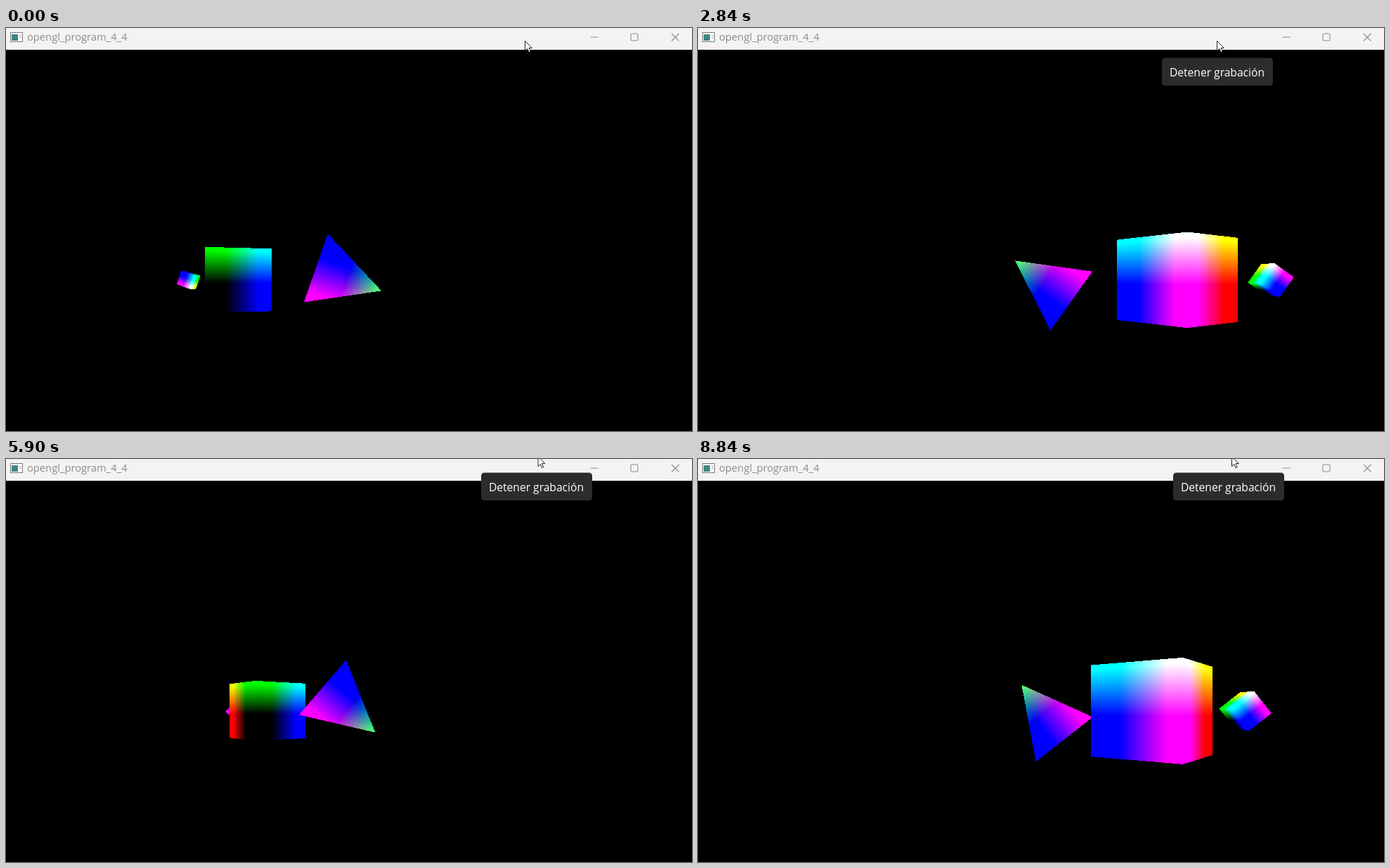
Animation, 976 px wide and 574 px high, one loop 8880 ms. Source, as an HTML page with a canvas:

```html
<!DOCTYPE html>
<html lang="es">
<head>
<meta charset="utf-8">
<title>opengl_program_4_4</title>
<style>
html, body { margin: 0; width: 100%; height: 100%; overflow: hidden; background: #000; }
canvas, svg { position: absolute; left: 0; top: 0; display: block; }
text { font-family: "Open Sans", "Noto Sans", sans-serif; }
</style>
</head>
<body>
<canvas id="view" width="976" height="574"></canvas>
<svg width="976" height="574" viewBox="0 0 976 574">
  <rect width="976" height="31" fill="#f3f3f3"/>
  <g id="icon">
    <rect x="6.5" y="6.5" width="17" height="13" fill="#fff" stroke="#777"/>
    <rect x="8" y="9" width="9" height="9" fill="#3f8582"/>
    <path d="M19 10.5h3M19 13.5h3" stroke="#999"/>
  </g>
  <text x="30" y="18" font-size="14.7" fill="#8c8c8c">opengl_program_4_4</text>
  <g fill="none" stroke="#8c8c8c" stroke-width="1.1">
    <path d="M831.5 13h11M947 8l10.5 10.5M957.5 8L947 18.5"/>
    <rect x="889" y="8" width="10" height="10" rx="1.5"/>
  </g>
  <g id="tip">
    <rect y="-.5" width="158" height="39.5" rx="4.5" fill="#2c2c2c"/>
    <text x="11" y="25.5" font-size="15.6" fill="#fff">Detener grabación</text>
  </g>
  <path id="cursor" d="M.5.5V14.5L3.800 11.4 6 16.5 8.2 15.5 6 10.5H10.3Z" fill="#fff" stroke="#222"/>
</svg>
<script>
const LOOP = 8880, LAST_STEP = 265, W = 976, H = 574;
const CX = 489.5, CY = 358.8, FOCAL = 566, CAM = 12;
const ctx = document.getElementById('view').getContext('2d');
const tip = document.getElementById('tip');
const cursor = document.getElementById('cursor');
const img = ctx.createImageData(W, H);
const pixels = new Uint32Array(img.data.buffer);

const ANGLES = [[0, -109.2], [49, -15.8], [85, 54.5], [141, 158.3], [177, 229.4], [223, 316.5], [265, 398.1]];

// Colour of a point is its model position plus this
const TINT = [.3, .1, .4];

const ramp = (t, a, b) => Math.min(1, Math.max(0, (t - a) / (b - a)));
const ease = k => k * k * (3 - 2 * k);

function angleAt(step) {
  let i = 1;
  while (step > ANGLES[i][0]) i++;
  const [n0, a0] = ANGLES[i - 1], [n1, a1] = ANGLES[i];
  return (a0 + (a1 - a0) * (step - n0) / (n1 - n0)) * Math.PI / 180;
}

function vertex(point, place) {
  const [x, y, z] = place(point);
  const w = 1 / (CAM - z);
  return { x: CX + x * FOCAL * w, y: CY - y * FOCAL * w, w, color: point.map((p, i) => p + TINT[i]) };
}

// Perspective-correct colour fill; the byte array clamps to 0..255
function triangle(a, b, c) {
  const area = (b.x - a.x) * (c.y - a.y) - (b.y - a.y) * (c.x - a.x);
  if (Math.abs(area) < 1e-6) return;
  const xs = [a.x, b.x, c.x], ys = [a.y, b.y, c.y];
  const x0 = Math.max(0, Math.floor(Math.min(...xs))), x1 = Math.min(W - 1, Math.ceil(Math.max(...xs)));
  const y0 = Math.max(0, Math.floor(Math.min(...ys))), y1 = Math.min(H - 1, Math.ceil(Math.max(...ys)));
  for (let y = y0; y <= y1; y++) {
    for (let x = x0; x <= x1; x++) {
      const px = x + .5, py = y + .5;
      let u = ((b.x - px) * (c.y - py) - (b.y - py) * (c.x - px)) / area;
      let v = ((c.x - px) * (a.y - py) - (c.y - py) * (a.x - px)) / area;
      let s = 1 - u - v;
      if (u < 0 || v < 0 || s < 0) continue;
      u *= a.w; v *= b.w; s *= c.w;
      const k = 255 / (u + v + s), o = (y * W + x) * 4;
      for (let i = 0; i < 3; i++) {
        img.data[o + i] = (u * a.color[i] + v * b.color[i] + s * c.color[i]) * k;
      }
    }
  }
}

function drawCube(place) {
  const mid = place([0, 0, 0]);
  for (let axis = 0; axis < 3; axis++) {
    for (const side of [-1, 1]) {
      const point = (u, v) => {
        const p = [];
        p[axis] = side;
        p[(axis + 1) % 3] = u;
        p[(axis + 2) % 3] = v;
        return p;
      };
      const face = place(point(0, 0));
      const facing = face.reduce((sum, f, i) => sum + (f - mid[i]) * ((i === 2 ? CAM : 0) - f), 0);
      if (facing <= 0) continue;
      const [a, b, c, d] = [[-1, -1], [1, -1], [1, 1], [-1, 1]].map(([u, v]) => vertex(point(u, v), place));
      triangle(a, b, c);
      triangle(a, c, d);
    }
  }
}

// Only the front face of the pyramid ever shows
function drawPyramid(place) {
  triangle(...[[-1, -1, 1], [1, -1, 1], [0, 1, 0]].map(p => vertex(p, place)));
}

function drawScene(a) {
  const s = Math.sin(a), c = Math.cos(a);
  const sun = ([x, y, z]) => [x * c - y * s, x * s + y * c, z];
  const planet = ([x, y, z]) => [4 * s + x * c - z * s, y, 4 * c + x * s + z * c];
  const moon = p => {
    const [x, y, z] = sun(p);
    return [6 * s + x / 4, y / 4, 6 * c + z / 4];
  };
  pixels.fill(0xff000000);
  const parts = [() => drawCube(moon), () => drawCube(planet), () => drawPyramid(sun)];
  if (c > 0) parts.reverse(); // far to near
  parts.forEach(draw => draw());
  ctx.putImageData(img, 0, 0);
}

function drawOverlay(t) {
  const move = ease(ramp(t, 3450, 3750));
  const x = 738 + 18.5 * move + 2.5 * ramp(t, 6750, 6900);
  cursor.setAttribute('transform', `translate(${x} ${18 - 22 * move})`);
  const second = t > 4000;
  tip.setAttribute('transform', second ? 'translate(676 20)' : 'translate(660 43)');
  tip.setAttribute('opacity', second ? ramp(t, 4500, 4865) : ramp(t, 950, 1100) - ramp(t, 3450, 3600));
}

let shown = -1;
const start = performance.now();
function frame() {
  const t = (performance.now() - start) % LOOP;
  const step = Math.min(LAST_STEP, Math.floor(Math.floor(t / 10) * .3 + 1e-6));
  if (step !== shown) {
    shown = step;
    drawScene(angleAt(step));
    drawOverlay(t);
  }
  requestAnimationFrame(frame);
}
frame();
</script>
</body>
</html>
```
